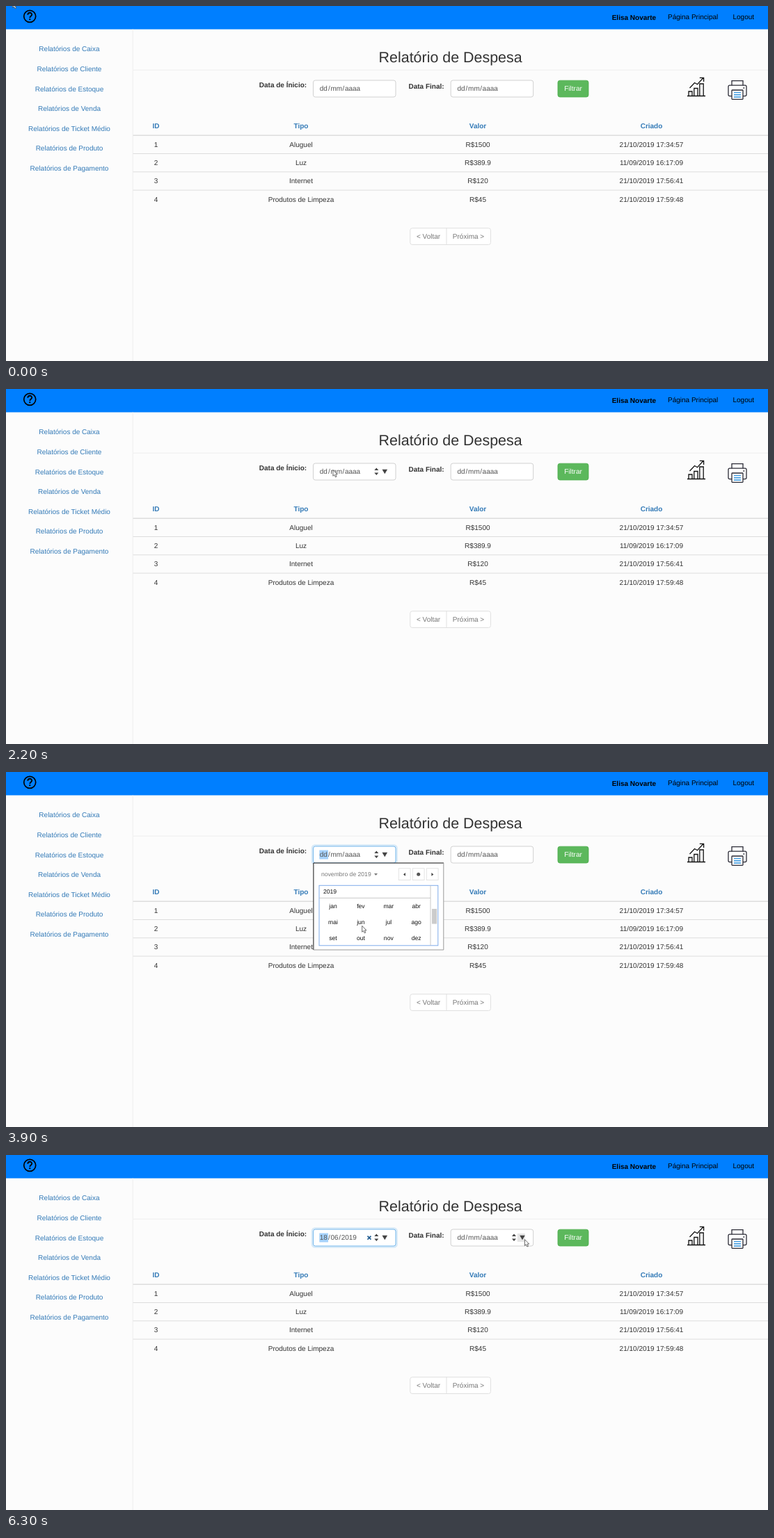
Recreate the animation shown at these times as an HTML page. Size 1095 px wide and 511 px high, loop 8000 ms.

```html
<!DOCTYPE html>
<html lang="pt-BR">
<head>
<meta charset="utf-8">
<title>Relatório de Despesa</title>
<style>
html, body { margin: 0; width: 100%; height: 100%; overflow: hidden; background: #fcfcfc; }
svg { display: block; width: 1095px; height: 511px; }
text { font-family: "Liberation Sans", Arial, sans-serif; font-size: 10px; fill: #333; text-rendering: geometricPrecision; white-space: pre; }
</style>
</head>
<body>
<svg id="stage" viewBox="0 0 1095 511" xmlns="http://www.w3.org/2000/svg"></svg>
<script>
const LOOP = 8000;
const NS = "http://www.w3.org/2000/svg";
const stage = document.getElementById("stage");

function el(parent, tag, attrs, content) {
  const n = document.createElementNS(NS, tag);
  for (const k in attrs) n.setAttribute(k, attrs[k]);
  if (content !== undefined) n.textContent = content;
  parent.appendChild(n);
  return n;
}
const group = (p = stage) => el(p, "g", {});
const path = (p, d, attrs) => el(p, "path", { d, fill: "none", ...attrs });
const rect = (p, x, y, width, height, attrs) => el(p, "rect", { x, y, width, height, ...attrs });
// Text placed by the vertical middle of its capitals
function label(p, s, x, y, o = {}) {
  const size = o.size || 10;
  return el(p, "text", {
    x, y: y + size * 0.345, "text-anchor": o.anchor || "middle",
    style: `font-size:${size}px;fill:${o.fill || "#333"};font-weight:${o.bold ? 700 : 400}`
  }, s);
}
const left = (p, s, x, y, o) => label(p, s, x, y, { ...o, anchor: "start" });
const show = (n, on) => n.setAttribute("opacity", +on);
const clamp = v => Math.max(0, Math.min(1, v));

function drawHeader() {
  const g = group();
  rect(g, 0, 0, 1095, 33.5, { fill: "#007fff" });
  el(g, "circle", { cx: 34.2, cy: 14.8, r: 8.5, fill: "none", stroke: "#000", "stroke-width": 1.7 });
  path(g, "M31.3 12.7C31.3 8.8 37.2 8.8 37.2 12.5C37.2 14.4 34.3 14.6 34.3 17", { stroke: "#000", "stroke-width": 1.8 });
  el(g, "circle", { cx: 34.3, cy: 19.2, r: 1.1 });
  left(g, "Elisa Novarte", 870.7, 16.3, { bold: true, fill: "#000" });
  left(g, "Página Principal", 951, 15.3, { fill: "#000" });
  left(g, "Logout", 1044.5, 15.3, { fill: "#000" });
}

function drawSidebar() {
  const g = group();
  path(g, "M182.2 33.5V511M182.5 92.2H1095", { stroke: "#eee" });
  ["Caixa", "Cliente", "Estoque", "Venda", "Ticket Médio", "Produto", "Pagamento"]
    .forEach((s, i) => label(g, "Relatórios de " + s, 91, 62 + i * 28.55, { fill: "#337ab7" }));
}

function drawIcons() {
  const g = group();
  path(g, "M979 129.5H1005M981 129V123H986V129M988.8 129V118.5H994V129M996.8 129V112H1002.2V129M982.5 118L989.5 110.5L993.5 112.8L1002 103.5M996.8 103.4H1002.6V109",
    { stroke: "#111", "stroke-width": 1.3 });
  const ink = { stroke: "#2b2b36", "stroke-width": 1.3, fill: "#fff" };
  path(g, "M1043 115V107.6H1059V115", ink);
  rect(g, 1038, 114.2, 26, 15.4, { rx: 2, ...ink });
  rect(g, 1043, 121, 16, 13.3, { rx: .8, ...ink });
  path(g, "M1046 124.6H1056M1046 127.8H1056M1046 131H1056", { stroke: "#3596e0", "stroke-width": 1.4 });
  el(g, "circle", { cx: 1060.3, cy: 118, r: .9, fill: "#2b2b36" });
}

function drawTable() {
  const g = group();
  const cols = [215.5, 424, 678, 927.5];
  const rows = [
    ["1", "Aluguel", "R$1500", "21/10/2019 17:34:57"],
    ["2", "Luz", "R$389.9", "11/09/2019 16:17:09"],
    ["3", "Internet", "R$120", "21/10/2019 17:56:41"],
    ["4", "Produtos de Limpeza", "R$45", "21/10/2019 17:59:48"]
  ];
  ["ID", "Tipo", "Valor", "Criado"].forEach((s, i) => label(g, s, cols[i], 172.5, { bold: true, fill: "#337ab7" }));
  path(g, "M182.5 186.2H1095", { stroke: "#ddd", "stroke-width": 1.5 });
  rows.forEach((row, r) => {
    const y = 199.3 + r * 26.3;
    row.forEach((s, i) => label(g, s, cols[i], y));
    if (r) path(g, `M182.5 ${y - 13.1}H1095`, { stroke: "#ddd" });
  });
  rect(g, 580.8, 319.8, 115.7, 23.7, { rx: 3, fill: "#fff", stroke: "#ddd", "stroke-width": .9 });
  path(g, "M633 319.8V343.5", { stroke: "#ddd", "stroke-width": .9 });
  label(g, "< Voltar", 607, 331.3, { fill: "#777" });
  label(g, "Próxima >", 664.5, 331.3, { fill: "#777" });
}

function dateField(x) {
  const g = group();
  const glow = rect(g, x - 1.5, 105.5, 121.5, 27, { rx: 4, fill: "none", stroke: "#66afe9", "stroke-width": 2.5, "stroke-opacity": .25 });
  const box = rect(g, x, 107, 118.5, 24, { rx: 3, fill: "#fff", stroke: "#ccc", "stroke-width": .9 });
  const pick = rect(g, x + 8.8, 112.5, 12.7, 13, { fill: "#a6d2fb" });
  const write = (parts, xs) => {
    const n = group(g);
    parts.forEach((s, i) => left(n, s, x + xs[i], 119, { fill: "#555" }));
    return n;
  };
  const empty = write(["dd", "/", "mm", "/", "aaaa"], [9.3, 21.4, 24.9, 42.1, 45.4]);
  const filled = write(["18", "/", "06", "/", "2019"], [9.3, 21.4, 24.9, 36.7, 40.2]);
  const spinHover = rect(g, x + 85.6, 119, 10.6, 7, { fill: "#ccc" });
  const dropHover = rect(g, x + 95.6, 113, 11, 12, { fill: "#e6e6e6" });
  const arrows = group(g);
  path(arrows, `M${x + 87.8} 117l3 -3.4l3 3.4zM${x + 87.8} 120.6l3 3.4l3 -3.4zM${x + 99} 115.7h7.6l-3.8 6.6z`, { fill: "#444" });
  const clear = path(g, `M${x + 78} 116.6l5 5m0 -5l-5 5`, { stroke: "#205c90", "stroke-width": 1.6 });
  return s => {
    show(glow, s.focus);
    box.setAttribute("stroke", s.focus ? "#66afe9" : "#ccc");
    show(pick, s.focus);
    show(empty, !s.filled);
    show(filled, s.filled);
    show(clear, s.filled);
    show(arrows, s.arrows);
    show(spinHover, s.spin);
    show(dropHover, s.drop);
  };
}

function popup(bottom, gridBottom, title, o) {
  const g = group();
  rect(g, 441.5, 131, 187.5, bottom - 131, { fill: "#fff" });
  path(g, `M441.9 ${bottom}V131H629`, { stroke: o.edge });
  path(g, `M628.8 131V${bottom}` + (o.closed ? "H441.9" : ""), { stroke: "#999" });
  left(g, title, 453, 147.4, { size: 8.6, fill: o.dim ? "#777" : "#111" });
  path(g, `M${o.tip} 146h5l-2.5 3z`, { fill: o.dim ? "#777" : "#222" });
  [564.3, 584.3, 604.3].forEach(x => rect(g, x, 138.8, 16.8, 16.8, { fill: "#fff", stroke: o.dim ? "#ddd" : "#bbb", "stroke-width": .8 }));
  path(g, "M574 145l-3 2.4l3 2.4zM611.4 145l3 2.4l-3 2.4z", { fill: "#444" });
  el(g, "circle", { cx: 592.7, cy: 147.3, r: 2.5, fill: "#555" });
  rect(g, 450, 163.3, 170.8, gridBottom - 163.3, { fill: "#fff", stroke: o.focus ? "#7fabea" : "#bbb" });
  return g;
}

// lead: days of the previous month shown first; prev and count: month lengths
function monthPage(g, lead, prev, count, rows) {
  const cx = i => 462.4 + i * 24.28;
  const small = { size: 8.6, fill: "#111" };
  ["dom", "seg", "ter", "qua", "qui", "sex", "sáb"].forEach((s, i) => label(g, s, cx(i), 172.4, small));
  path(g, "M450 181.4H620.8", { stroke: "#bbb", "stroke-width": .8 });
  for (let i = 0; i < rows * 7; i++) {
    const d = i - lead + 1;
    const inside = d > 0 && d <= count;
    const n = d < 1 ? prev + d : inside ? d : d - count;
    label(g, n, cx(i % 7), 188.3 + Math.floor(i / 7) * 14.27, { size: 8.6, fill: inside ? "#111" : "#bbb" });
  }
}

function yearPage(g) {
  left(g, "2019", 456, 172.4, { size: 8.6, fill: "#111" });
  path(g, "M450 181.4H610M610 163.3V249.8", { stroke: "#bbb", "stroke-width": .8 });
  rect(g, 612, 197, 7.2, 21.6, { fill: "#ccc" });
  "jan fev mar abr mai jun jul ago set out nov dez".split(" ").forEach((s, i) =>
    label(g, s, 470 + (i % 4) * 39.9, 193.3 + Math.floor(i / 4) * 22.9, { size: 8.6, fill: "#111" }));
}

drawHeader();
drawSidebar();
label(stage, "Relatório de Despesa", 638.6, 73.8, { size: 21.43 });
left(stage, "Data de Ínicio:", 363.8, 114, { bold: true });
left(stage, "Data Final:", 578.5, 115.6, { bold: true });
const startField = dateField(441.5);
const endField = dateField(639.2);
rect(stage, 793, 107.2, 44, 23.8, { rx: 3, fill: "#5cb85c", stroke: "#4cae4c", "stroke-width": .8 });
label(stage, "Filtrar", 815, 119, { fill: "#fff" });
drawIcons();
drawTable();

const november = popup(262, 253.6, "novembro de 2019", { edge: "#999", focus: true, tip: 529 });
rect(november, 474.8, 195.7, 23.6, 14, { fill: "none", stroke: "#bbb", "stroke-width": .9 });
monthPage(november, 5, 31, 30, 5);
const months = popup(256, 249.8, "novembro de 2019", { edge: "#111", focus: true, dim: true, closed: true, tip: 529 });
yearPage(months);
const june = popup(274.5, 267.8, "junho de 2019", { edge: "#111", tip: 512 });
monthPage(june, 6, 31, 30, 6);

const status = group();
rect(status, -1, 497, 176, 15, { rx: 1.5, fill: "#808080", stroke: "#6c6c6c", "stroke-width": .8 });
el(status, "text", { x: 2.6, y: 507.8, style: "font-family:'Open Sans',sans-serif;font-size:8.1px;fill:#dcdcdc" },
  "localhost/projeto/relatorios/graficoDespesa/");

const cursor = path(stage, "M.4 .4V9.3L2.4 7.5L3.9 10.8L5.5 10.1L4.1 6.9H6.7Z",
  { fill: "#fff", stroke: "#444", "stroke-width": .8, "stroke-linejoin": "round" });

// time, x, y
const track = [
  [0, 9, -7], [299, 9, -7], [300, 726, 136], [1100, 530, 119], [1300, 492.3, 124],
  [1900, 454, 125], [2100, 454, 125], [2200, 469.5, 116], [2600, 540, 121], [2700, 540, 121],
  [3000, 511, 134], [3200, 512, 143], [3300, 512, 143], [3600, 513, 190], [3900, 511.3, 221],
  [4300, 511.3, 221], [4600, 503, 215.5], [4700, 503, 215.5], [4900, 510.8, 224], [5100, 510.8, 224],
  [5900, 743, 123], [6000, 745, 123], [6100, 745, 123], [6300, 745, 121.2], [LOOP, 745, 121.2]
];
function position(t) {
  const i = track.findIndex(k => k[0] > t);
  const [a, b] = [track[i - 1], track[i]];
  const p = (t - a[0]) / (b[0] - a[0]);
  return [a[1] + (b[1] - a[1]) * p, a[2] + (b[2] - a[2]) * p];
}
const over = (x, y, x0, x1) => x > x0 && x < x1 && y > 106 && y < 131;

function render(ms) {
  const t = Math.floor(ms / 100) * 100;
  const within = (a, b) => t >= a && t < b;
  const [x, y] = position(t);
  cursor.setAttribute("transform", `translate(${x} ${y})`);
  startField({
    focus: t >= 2800, filled: t >= 5100,
    arrows: t >= 2800 || over(x, y, 441, 560),
    spin: within(1100, 1200) || within(2500, 3300), drop: false
  });
  endField({
    focus: false, filled: false, spin: false,
    arrows: over(x, y, 639, 758), drop: over(x, y, 735, 747)
  });
  show(november, within(2800, 3300));
  show(months, within(3300, 4200));
  show(june, within(4200, 5100));
  show(status, t < 300 ? 0 : clamp((1700 - t) / 300));
}

const t0 = performance.now();
function tick() {
  render((performance.now() - t0) % LOOP);
  requestAnimationFrame(tick);
}
tick();
</script>
</body>
</html>
```
